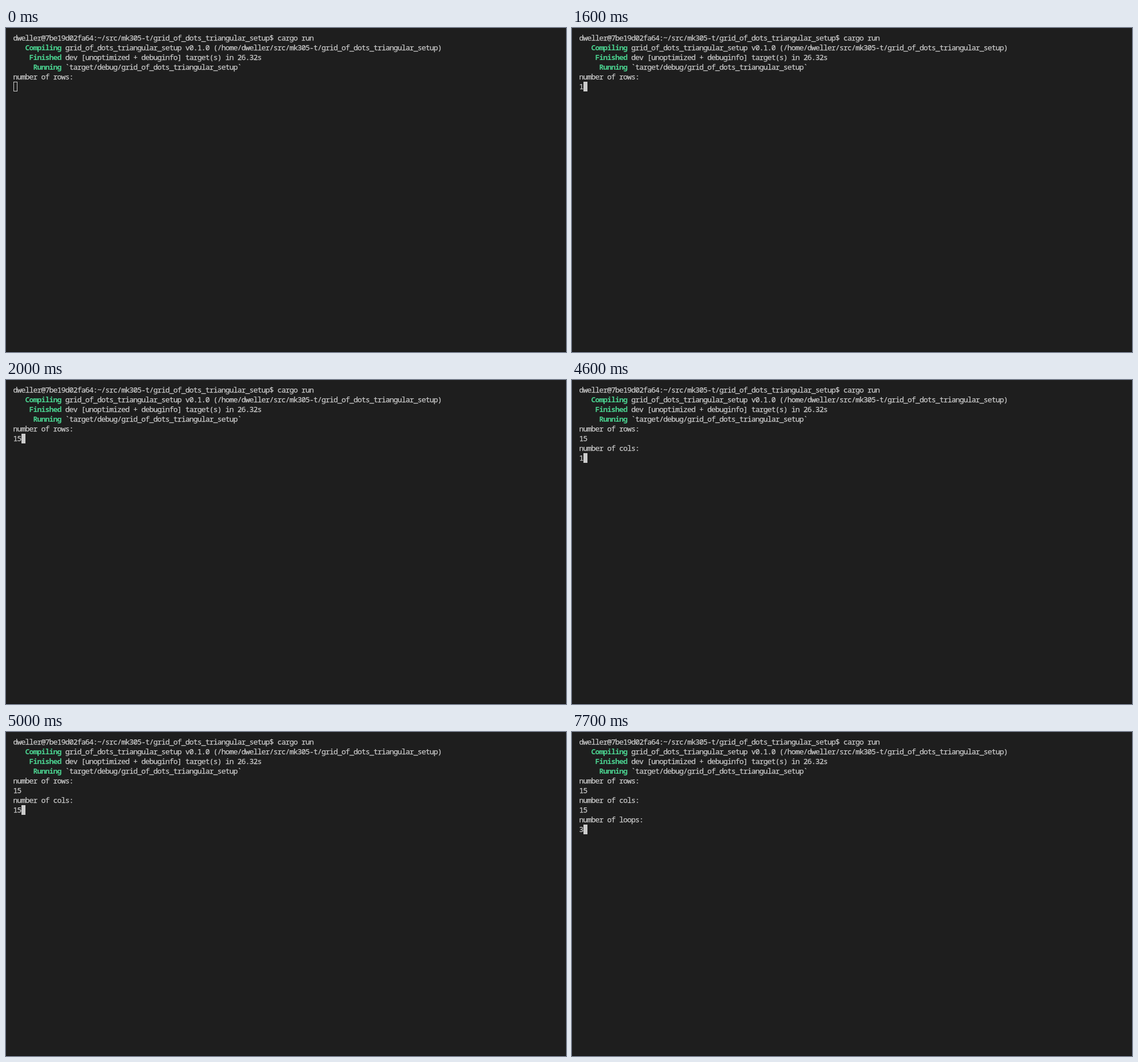
These frames come from a looping animation (979 px wide and 567 px high, 8000 ms). An HTML page:

```html
<!DOCTYPE html>
<html lang="en">
<head>
<meta charset="utf-8">
<title>Terminal</title>
<style>
  html, body { margin: 0; width: 100%; height: 100%; overflow: hidden; background: #1e1e1e; }
  svg { display: block; width: 979px; height: 567px; }
  text {
    font: 13px "Noto Sans Mono", "DejaVu Sans Mono", monospace;
    fill: #ccc; stroke: #ccc; stroke-width: 0.25px; white-space: pre;
  }
  .status { font-weight: 700; fill: #4bd390; stroke: none; }
</style>
</head>
<body>
<svg id="term" viewBox="0 0 979 567">
  <rect width="979" height="567" fill="#1e1e1e"/>
  <rect y="566" width="979" height="1" fill="#151515"/>
  <rect id="cursor" width="6" height="16" stroke="#ccc"/>
</svg>
<script>
const CELL = 7, ROW = 17, LEFT = 13, TOP = 9, LOOP = 8000;
const project = "grid_of_dots_triangular_setup";
const folder = "src/mk305-t/" + project;
const term = document.getElementById("term");
const cursor = document.getElementById("cursor");

// Every character sits on the terminal's fixed cell grid.
function write(row, col, str, cls = "") {
  const el = document.createElementNS(term.namespaceURI, "text");
  const xs = Array.from(str, (_, i) => LEFT - 0.4 + (col + i) * CELL);
  el.setAttribute("x", xs.join(" "));
  el.setAttribute("y", TOP + 13 + row * ROW);
  el.setAttribute("class", cls);
  el.textContent = str;
  term.insertBefore(el, cursor);
  return el;
}

function status(row, label, rest) {
  write(row, 12 - label.length, label, "status");
  write(row, 13, rest);
}

write(0, 0, `dweller@7be19d02fa64:~/${folder}$ cargo run`);
status(1, "Compiling", `${project} v0.1.0 (/home/dweller/${folder})`);
status(2, "Finished", "dev [unoptimized + debuginfo] target(s) in 26.32s");
status(3, "Running", `\`target/debug/${project}\``);
write(4, 0, "number of rows:");

// Text that appears later: [time, row, column, text]
const typed = [
  [1600, 5, 0, "1"],
  [2000, 5, 1, "5"],
  [3400, 6, 0, "number of cols:"],
  [4600, 7, 0, "1"],
  [5000, 7, 1, "5"],
  [5600, 8, 0, "number of loops:"],
  [7700, 9, 0, "3"]
].map(([at, row, col, str]) => ({ at, el: write(row, col, str) }));

// Cursor stops: [time, row, column]
const stops = [
  [0, 5, 0], [1600, 5, 1], [2000, 5, 2],
  [3400, 7, 0], [4600, 7, 1], [5000, 7, 2],
  [5600, 9, 0], [7700, 9, 1]
];
const FOCUS = 700;

function draw(t) {
  for (const { at, el } of typed) el.style.display = t >= at ? "" : "none";
  const [, row, col] = stops.filter(s => s[0] <= t).pop();
  cursor.setAttribute("x", LEFT + col * CELL + 0.5);
  cursor.setAttribute("y", TOP + row * ROW + 0.5);
  cursor.setAttribute("fill", t >= FOCUS ? "#ccc" : "none");
}

const start = performance.now();
function tick() {
  draw((performance.now() - start) % LOOP);
  requestAnimationFrame(tick);
}
tick();
</script>
</body>
</html>
```
